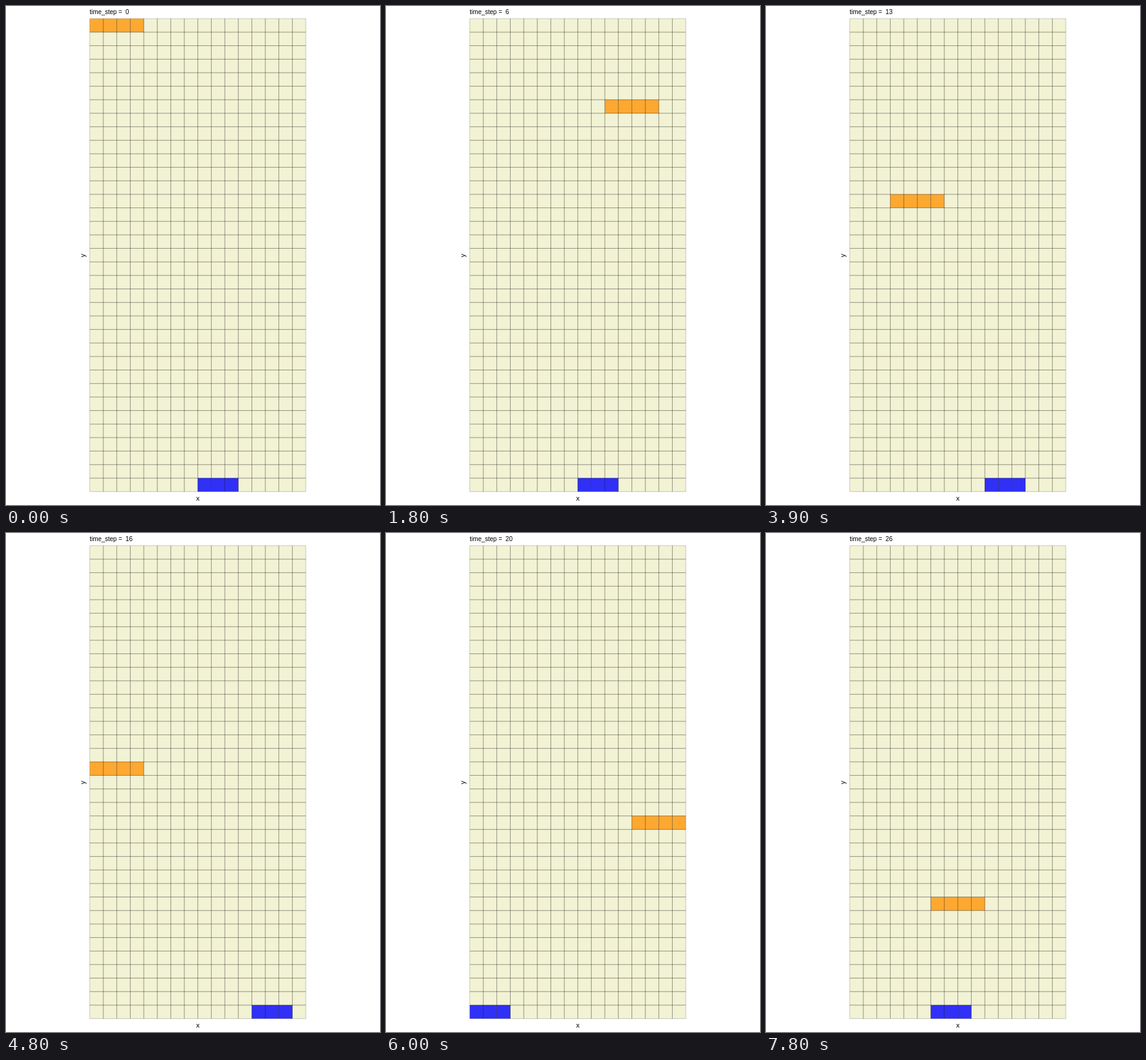
An HTML page for the animation above (8000 ms loop, 600 by 800 pixels).

```html
<!DOCTYPE html>
<html lang="en">
<head>
<meta charset="utf-8">
<title>Falling block</title>
<style>
  html, body { margin: 0; width: 100%; height: 100%; overflow: hidden; background: #fff; }
  svg { display: block; width: 600px; height: 800px; }
  text { font-family: "Liberation Sans", Arial, sans-serif; fill: #000; white-space: pre; }
  path { fill: none; stroke: #000; stroke-width: 0.8; }
</style>
</head>
<body>
<svg viewBox="0 0 600 800">
  <rect id="board" fill="#f2f2d4"/>
  <g id="block" fill="#fda830"></g>
  <g id="paddle" fill="#3030f6"></g>
  <path id="grid" stroke-opacity="0.5"/>
  <path id="frame" stroke-opacity="0.25"/>
  <text id="title" x="134.3" y="13" font-size="10"></text>
  <text x="307.8" y="793" font-size="11" text-anchor="middle">x</text>
  <text transform="translate(127 400) rotate(-90)" font-size="11" text-anchor="middle">y</text>
</svg>
<script>
const COLS = 16, ROWS = 35, CELL = 21.665, LEFT = 134.4, TOP = 20.3;
const STEP_MS = 300, LOOP_MS = 8000;
const byId = id => document.getElementById(id);
const mod = (a, n) => ((a % n) + n) % n;
const colX = c => LEFT + c * CELL;
const rowY = r => TOP + r * CELL;

function setAttrs(el, attrs) {
  for (const key in attrs) el.setAttribute(key, attrs[key]);
}

function makeCells(group, count) {
  return Array.from({ length: count }, () => {
    const cell = document.createElementNS("http://www.w3.org/2000/svg", "rect");
    setAttrs(cell, { width: CELL, height: CELL });
    return group.appendChild(cell);
  });
}

// Cells wrap around the sides of the board.
function place(cells, col, row) {
  cells.forEach((cell, i) =>
    setAttrs(cell, { x: colX(mod(col + i, COLS)), y: rowY(row) }));
}

// The paddle waits, edges right, then moves one column per step.
function paddleCol(step) {
  if (step < 9) return 8;
  return step < 15 ? 6 + Math.floor(step / 3) : step - 4;
}

const width = COLS * CELL, height = ROWS * CELL;
setAttrs(byId("board"), { x: LEFT, y: TOP, width, height });
let lines = "";
for (let c = 1; c < COLS; c++) lines += `M${colX(c)} ${TOP}v${height}`;
for (let r = 1; r < ROWS; r++) lines += `M${LEFT} ${rowY(r)}h${width}`;
byId("grid").setAttribute("d", lines);
byId("frame").setAttribute("d", `M${LEFT} ${TOP}h${width}v${height}h${-width}z`);

const block = makeCells(byId("block"), 4);
const paddle = makeCells(byId("paddle"), 3);

function draw(ms) {
  const step = Math.floor((ms % LOOP_MS) / STEP_MS);
  byId("title").textContent = `time_step =  ${step}`;
  place(block, -step, step);
  place(paddle, paddleCol(step), ROWS - 1);
}

const start = performance.now();
function tick() {
  draw(performance.now() - start);
  requestAnimationFrame(tick);
}
tick();
</script>
</body>
</html>
```
